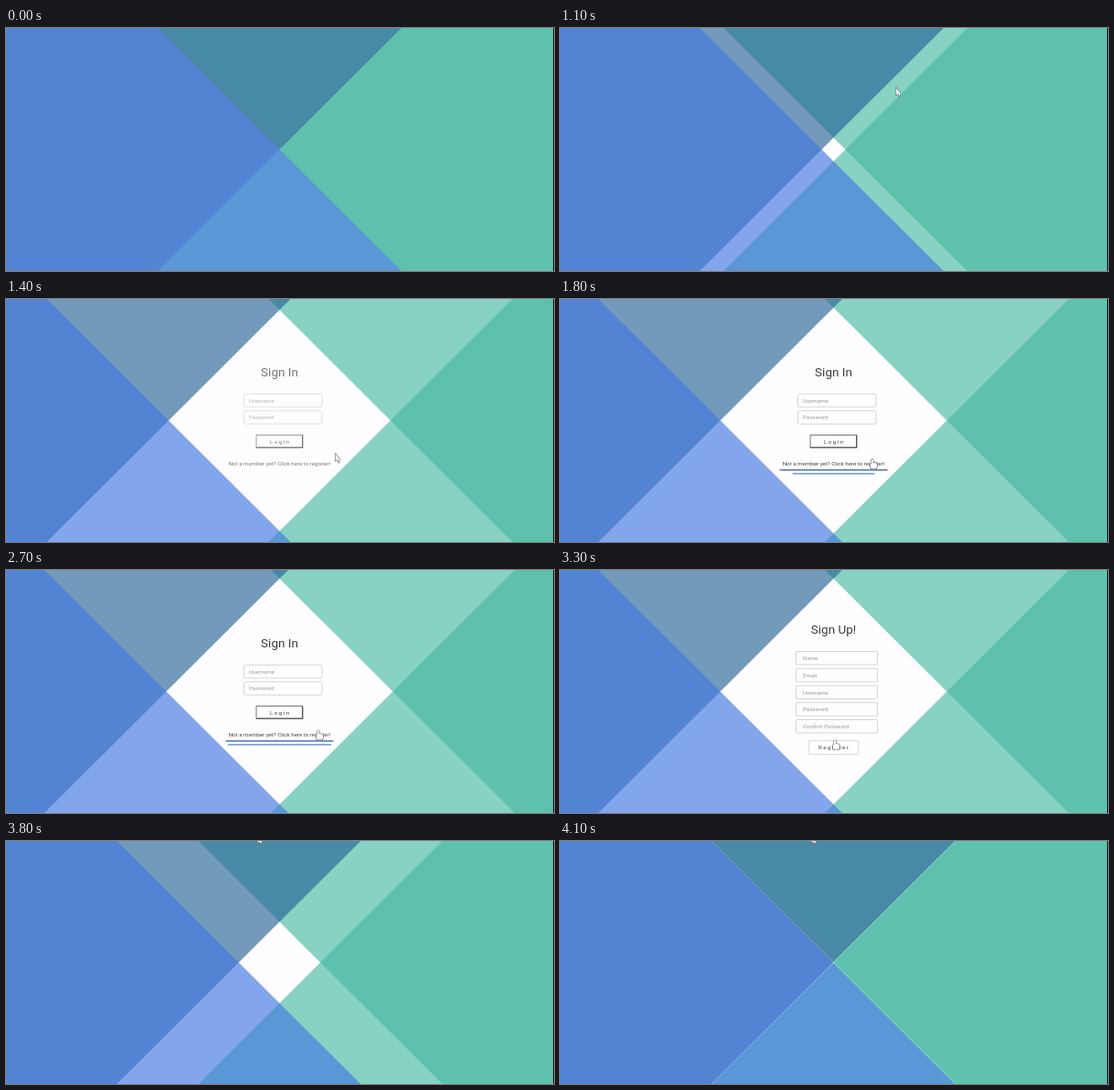
Animation, 600 px wide and 267 px high, one loop 4200 ms. Source, as an HTML page with a canvas:

```html
<!DOCTYPE html>
<html lang="en">
<head>
<meta charset="utf-8">
<style>
  html, body { margin: 0; width: 100%; height: 100%; overflow: hidden; background: #fffdff; }
  canvas { display: block; }
</style>
</head>
<body>
<canvas id="stage" width="600" height="267"></canvas>
<script>
const ctx = document.getElementById('stage').getContext('2d');
const WIDTH = 600, HEIGHT = 267, CX = 299.5, CY = HEIGHT / 2;
const LOOP = 4200, STEP = 100, SPREAD = 124, HAIRLINE = 0.7;
const OPEN = 1016, SWITCH = 2900, LEAVE = 3300, CLOSE = 3433, DELAY = 200, DURATION = 500;

const clamp = v => Math.min(1, Math.max(0, v));
const mix = (a, b, k) => a + (b - a) * k;

// cubic-bezier(0.445, 0.05, 0, 1)
function ease(x) {
  let lo = 0, hi = 1, s;
  for (let i = 0; i < 24; i++) {
    s = (lo + hi) / 2;
    if (1.335 * (1 - s) ** 2 * s + s ** 3 < x) lo = s; else hi = s;
  }
  return 0.15 * (1 - s) ** 2 * s + 3 * (1 - s) * s * s + s ** 3;
}
function tween(t, start, duration = DURATION) {
  const x = (t - start) / duration;
  return x <= 0 ? 0 : x >= 1 ? 1 : ease(x);
}

function poly(color, ...points) {
  ctx.beginPath();
  for (const [x, y] of points) ctx.lineTo(CX + x, CY + y);
  ctx.fillStyle = color;
  ctx.fill();
}
function rect(color, x, y, w, h) {
  ctx.fillStyle = color;
  ctx.fillRect(x, y, w, h);
}

function drawPanels(d) {
  const far = WIDTH / 2;
  rect('#5384d4', 0, 0, CX, HEIGHT);
  rect('#5dc1ad', CX, 0, WIDTH - CX, HEIGHT);
  poly('#488aa5', [0, 0], [-far, -far], [far, -far]);
  poly('#5a97d6', [0, 0], [-far, far], [far, far]);
  if (d > 0) {
    d = Math.max(d, HAIRLINE);
    const band = (color, sx, sy) => poly(color, [0, 0], [sx * d, 0],
      [sx * (d + far), sy * far], [sx * far, sy * (d + far)], [0, sy * d]);
    band('#739abb', -1, -1);
    band('#83a5eb', -1, 1);
    band('#87d2c3', 1, -1);
    band('#87d2c3', 1, 1);
    poly('#fffdff', [-d, 0], [0, -d], [d, 0], [0, d]);
  }
  rect('#111', WIDTH - 1, 0, 1, HEIGHT);
}

function text(str, x, y, color, size = 6.15, align = 'left', spacing = 0) {
  ctx.font = `${size}px Roboto, sans-serif`;
  ctx.letterSpacing = spacing + 'px';
  ctx.textAlign = align;
  ctx.fillStyle = color;
  ctx.fillText(str, x, y);
}
function outline(color, x, y, w, h, radius = 0) {
  ctx.beginPath();
  ctx.roundRect(x, y, w, h, radius);
  ctx.strokeStyle = color;
  ctx.lineWidth = 1;
  ctx.stroke();
}
const title = (str, y) => text(str, CX, y, '#3c3c3c', 13.5, 'center');
const label = (str, x, y) => text(str, x, y, '#444', 6.2, 'left', 1.45);

function fields(names, x, y, w, gap, radius) {
  names.forEach((name, i) => {
    const top = y + i * gap;
    outline('#d6d6d6', x, top, w, 14.5, radius);
    text(name, 266, top + 9.5, '#999');
  });
}

function drawSignIn(t) {
  title('Sign In', 85);
  fields(['Username', 'Password'], 260.5, 104.3, 85.5, 18.5, 2);
  outline('#777', 274, 149.5, 51, 14);
  rect('#555', 274, 162.5, 51, 1);
  rect('#555', 324, 149.5, 1, 14);
  label('Login', 289, 158.8);
  text('Not a member yet? Click here to register!', CX, 183.2, '#444', 6.2, 'center');
  const underline = (color, y, w) => rect(color, CX - w / 2, y, w, 1.4);
  underline('#4668a8', 187.2, 118 * tween(t, 1400, 300));
  underline('#5a90dc', 191.2, 113 * tween(t, 1600, 468));
}

function drawSignUp() {
  title('Sign Up!', 70);
  fields(['Name', 'Email', 'Username', 'Password', 'Confirm Password'], 258.5, 89.5, 89, 18.75, 0);
  outline('#ddd', 272.5, 187.5, 54, 15);
  label('Register', 283, 197.3);
}

function arrow(path, x, y) {
  for (const [dx, dy] of [[0, 0], [0, 7.5], [2, 6], [3.5, 9], [4.2, 5.5]]) path.lineTo(x + dx, y + dy);
  path.closePath();
}
function hand(path, x, y) {
  path.roundRect(x - 1, y, 2, 7, 1);
  path.roundRect(x - 2, y + 4, 7, 6.5, 2);
}

function drawCursor(t) {
  if (t < OPEN) return;
  // Swing down to the link, jump to the button, then exit upwards.
  let x = 356.5 + 14.5 * Math.cos(Math.PI * Math.min(1, (t - 1200) / 500));
  let y = 176 - 110 * 2 ** ((1100 - t) / 70);
  if (t >= SWITCH) {
    const k = clamp((t - LEAVE) / 200);
    x = mix(301, 275.7, k);
    y = mix(187, -5.5, k);
  }
  const path = new Path2D();
  (t >= 1500 && t <= LEAVE ? hand : arrow)(path, x, y);
  ctx.strokeStyle = '#666';
  ctx.fillStyle = '#fff';
  ctx.lineWidth = 1.2;
  ctx.stroke(path);
  ctx.fill(path);
}

function draw(now) {
  const t = Math.floor(now % LOOP / STEP) * STEP;
  drawPanels(SPREAD * (tween(t, OPEN) - tween(t, CLOSE + DELAY)));
  ctx.save();
  ctx.globalAlpha = clamp(tween(t, OPEN + DELAY) - tween(t, CLOSE));
  if (ctx.globalAlpha > 0.04) {
    if (t < SWITCH) drawSignIn(t); else drawSignUp();
  }
  ctx.restore();
  drawCursor(t);
}

const start = performance.now();
function tick() {
  draw(performance.now() - start);
  requestAnimationFrame(tick);
}
tick();
</script>
</body>
</html>
```
